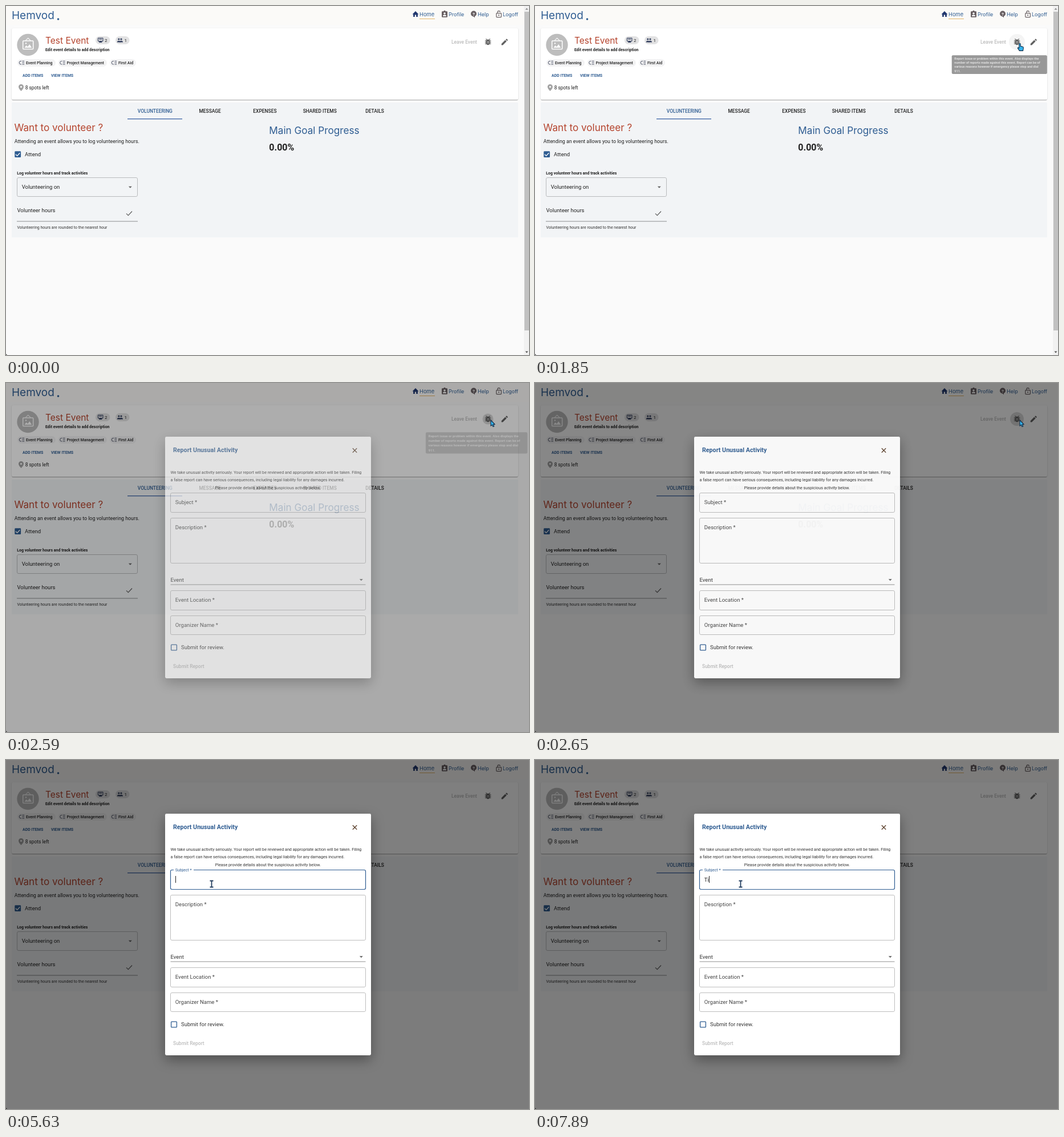
An HTML page with a canvas for the animation above (8000 ms loop, 917x611 px).

```html
<!DOCTYPE html>
<html lang="en">
<head>
<meta charset="utf-8">
<title>Report unusual activity</title>
<style>
html, body { margin: 0; width: 100%; height: 100%; overflow: hidden; background: #fafafa; }
canvas { display: block; }
</style>
</head>
<body>
<canvas id="stage" width="917" height="611"></canvas>
<script>
const W = 917, H = 611, LOOP = 8000, TICK = 66.3, OPEN = 2492;
const BLUE = '#2f5d92', NAVY = '#22386f', RED = '#b5442e', INK = '#212121', GREY = '#616161';
const UI = 'Roboto, sans-serif', HEAD = 'Inter, sans-serif';

const screen = document.getElementById('stage').getContext('2d');
const layer = () => {
  const c = document.createElement('canvas');
  c.width = W;
  c.height = H;
  return c.getContext('2d');
};
const page = layer(), modal = layer();
let g = page;

const clamp = v => Math.max(0, Math.min(1, v));
const mix = (a, b, u) => a + (b - a) * u;
const span = (t, start, length) => clamp((t - start) / length);
const sine = u => (1 - Math.cos(Math.PI * u)) / 2;

// cubic-bezier(.4, 0, .2, 1)
function ease(u) {
  if (u <= 0 || u >= 1) return clamp(u);
  let lo = 0, hi = 1, s = 0.5;
  for (let i = 0; i < 20; i++) {
    s = (lo + hi) / 2;
    const x = 1.2 * s * (1 - s) ** 2 + 0.6 * s * s * (1 - s) + s ** 3;
    if (x < u) lo = s; else hi = s;
  }
  return 3 * s * s * (1 - s) + s ** 3;
}

function text(s, x, y, size, color = INK, weight = 400, font = UI, align = 'left') {
  g.font = `${weight} ${size}px ${font}`;
  g.textAlign = align;
  g.fillStyle = color;
  g.fillText(s, x, y);
}
function box(x, y, w, h, r, fill, stroke, line = 1) {
  g.beginPath();
  g.roundRect(x, y, w, h, r);
  paint(fill, stroke, line);
}
function disc(x, y, r, fill, stroke, line = 1) {
  g.beginPath();
  g.arc(x, y, r, 0, 7);
  paint(fill, stroke, line);
}
function shape(d, x, y, fill, stroke, line = 1) {
  const p = new Path2D(d);
  g.save();
  g.translate(x, y);
  if (fill) { g.fillStyle = fill; g.fill(p); }
  if (stroke) { g.strokeStyle = stroke; g.lineWidth = line; g.stroke(p); }
  g.restore();
}
function paint(fill, stroke, line) {
  if (fill) { g.fillStyle = fill; g.fill(); }
  if (stroke) { g.strokeStyle = stroke; g.lineWidth = line; g.stroke(); }
}
function rect(x, y, w, h, fill) {
  g.fillStyle = fill;
  g.fillRect(x, y, w, h);
}
function shadow(blur, dy, color) {
  g.shadowBlur = blur;
  g.shadowOffsetY = dy;
  g.shadowColor = color;
}

function drawHeader() {
  rect(0, 0, W, 33, '#fbfaf8');
  text('Hemvod', 10, 23, 19, BLUE, 400, HEAD);
  disc(91.5, 23, 1.8, BLUE);

  shape('M0 5.5L5.5 0L11 5.5H9.4V10H6.7V6.5H4.3V10H1.6V5.5Z', 712.5, 9, NAVY);
  text('Home', 725, 18, 9.3, BLUE, 400, HEAD);
  rect(725, 22, 27, 1, '#e5b566');

  const tone = '#685f62';
  box(764, 9.3, 10, 10.4, 1.2, tone);
  disc(769, 9.3, 1.6, tone);
  disc(769, 13, 1.7, '#fff');
  shape('M0 2.4Q0 0 3 0T6 2.4Z', 766, 15.6, '#fff');
  text('Profile', 776, 18, 9, BLUE, 400, HEAD);

  disc(820, 13.5, 5, tone);
  shape('M0 0H3V3Z', 819, 17.5, tone);
  text('?', 820, 16.6, 8, '#fff', 700, UI, 'center');
  text('Help', 827, 18, 9.1, BLUE, 400, HEAD);

  box(859.8, 12.6, 8.6, 7, 0.8, null, tone, 1.2);
  shape('M0 4V2.4A2.2 2.2 0 0 1 4.4 2.4', 861.9, 8.4, null, tone, 1.2);
  disc(864.1, 16.1, 1.1, tone);
  text('Logoff', 871, 18, 8.8, BLUE, 400, HEAD);
}

function drawChip(label, x, w) {
  box(x, 93, w, 13, 6.5, '#f3f3f4');
  shape('M4 0H3A2.8 2.8 0 0 0 3 5.6H4M5.3 0H9.2M5.3 2.8H9.2M5.3 5.6H9.2', x + 3, 96.5, null, '#3c4257', 0.9);
  text(label, x + 15, 102, 7, INK, 500);
}

function drawCard() {
  g.save();
  shadow(2, 0.7, 'rgba(0,0,0,.22)');
  box(10, 39, 888, 125, 2.4, '#fff');
  g.restore();
  rect(11, 164, 886, 1, 'rgba(0,0,0,.2)');

  disc(38.5, 68, 19.2, '#bdbdbd');
  box(29.7, 61, 18, 14.5, 1, null, '#fff', 1.5);
  shape('M0 4.5L4.5 0L9 4.5', 34.2, 56.2, null, '#fff', 1.1);
  shape('M0 6L3.5 2L6 4.5L9 0L13 6Z', 32.2, 67, '#fff');
  disc(35, 65.4, 1.2, '#fff');

  text('Test Event', 69, 66, 15.5, RED, 400, HEAD);
  text('Edit event details to add description', 69, 79, 7, INK, 700);

  box(157, 53, 25.5, 14, 7, '#e2e2e3');
  box(161.4, 56, 8.6, 5.6, 0.8, null, '#34405f', 1.1);
  rect(163, 57.4, 5.4, 1.2, '#34405f');
  shape('M1.5 0H4.5L6 2.4H0Z', 162.7, 61.6, '#34405f');
  text('2', 173, 63, 8);
  box(192, 53, 24.5, 14, 7, '#e2e2e3');
  for (const x of [197.8, 202]) {
    disc(x, 58, 1.6, '#34405f');
    shape('M0 2.8Q0 0 3 0T6 2.8Z', x - 3, 60.7, '#34405f');
  }
  text('1', 207.5, 63, 8);

  drawChip('Event Planning', 20, 67);
  drawChip('Project Management', 91.5, 85.5);
  drawChip('First Aid', 182, 46);
  text('ADD ITEMS', 29, 123.5, 7, BLUE, 700);
  text('VIEW ITEMS', 79, 123.5, 7, BLUE, 700);
  shape('M4.5 0A4.5 4.5 0 0 1 9 4.5Q9 7.5 4.5 12Q0 7.5 0 4.5A4.5 4.5 0 0 1 4.5 0Z', 22, 137, '#a3a3a3');
  disc(26.5, 141.5, 1.6, '#fff');
  text('8 spots left', 33.7, 145.5, 8.4);
  text('Leave Event', 781, 66, 8.4, '#bcbcbc', 500);
}

function drawTools() {
  box(842, 58.6, 6.2, 9.6, 3.1, GREY);
  shape('M0 2.6H10.4M0 5.2H10.4M0 7.8H10.4M3 .8L1.6 -.8M7.4 .8L8.8 -.8', 839.9, 58.3, null, GREY, 1.3);
  rect(844, 61.9, 2.4, 1, '#eee');
  rect(844, 64.1, 2.4, 1, '#eee');
  shape('M0 8.4L6.6 1.8L9 4.2L2.4 10.8H0ZM7.4 1L8.4 0Q9 -.5 9.6 0L10.8 1.2Q11.3 1.8 10.8 2.4L9.8 3.4Z', 868.7, 57.8, GREY);
}

function drawPanel() {
  rect(10, 169, 888, 236, '#f2f4f6');
  ['VOLUNTEERING', 'MESSAGE', 'EXPENSES', 'SHARED ITEMS', 'DETAILS'].forEach((s, i) =>
    text(s, 261.3 + i * 96.3, 186.8, 8.45, i ? INK : BLUE, 500, UI, 'center'));
  rect(213, 197, 96, 1.3, '#3d63a5');

  text('Want to volunteer ?', 14.5, 219, 17.1, RED, 400, HEAD);
  text('Attending an event allows you to log volunteering hours.', 14.7, 239.8, 8.85);
  box(15.3, 254.3, 10.8, 10.8, 1.4, BLUE);
  shape('M0 3L2.6 5.6L7.4 .4', 17, 256.8, null, '#fff', 1.3);
  text('Attend', 33, 263, 9.55);
  text('Log volunteer hours and track activities', 19.2, 294.5, 7, INK, 700);
  box(19.5, 300.5, 211, 33, 2.4, null, '#b9bbbd');
  text('Volunteering on', 27.7, 320, 9.55);
  shape('M0 0H6L3 3Z', 214.8, 315.8, GREY);
  text('Volunteer hours', 19.4, 361, 9.55);
  shape('M0 4.4L3.3 7.6L10 .5', 211, 359, null, GREY, 1.3);
  rect(19, 376.5, 212, 1, '#8b8d8f');
  text('Volunteering hours are rounded to the nearest hour', 19.4, 389.5, 7, '#333');

  text('Main Goal Progress', 461.3, 224, 17.15, BLUE, 400, HEAD);
  text('0.00%', 461.3, 253.3, 16, INK, 700);
}

function drawScrollbar() {
  rect(908, 0, 9, H, '#f1f1f1');
  rect(909, 10, 8, 558, '#c1c1c1');
  shape('M0 3L2.5 0L5 3Z', 910.5, 3.5, '#8a8a8a');
  shape('M0 0L2.5 3L5 0Z', 910.5, 604.5, '#505050');
}

function drawField(label, y, h) {
  box(288.5, y + 0.5, 342, h, 2.4, null, '#bdbdbd');
  text(label, 296.8, y + 20, 9.55, '#444');
}

function drawSubject(t) {
  const u = ease(span(t, 3500, 200)), focused = t >= 3500;
  box(288.5, 192.5, 342, 34, 2.4, null, focused ? BLUE : '#bdbdbd', focused ? 1.2 : 1);
  if (focused) rect(mix(310, 294, u), 191, mix(0, 35, u), 3, '#fff');
  text('Subject *', 296.8, mix(212.3, 194.6, u), mix(9.55, 7.2, u), focused ? BLUE : '#444');
  if (!focused) return;

  const typed = t < 7750 ? '' : t < 7880 ? 'T' : 'Ti';
  text(typed, 296.8, 212.5, 9.55);
  const blinks = [4030, 4570, 5085, 5625, 6155, 6685, 7145, 7685].filter(b => t >= b - 5).length;
  if (blinks % 2 === 0) rect(297 + g.measureText(typed).width, 203, 1, 12, INK);
}

function drawModal(t) {
  g = modal;
  g.clearRect(0, 0, W, H);
  g.save();
  shadow(22, 8, 'rgba(0,0,0,.36)');
  box(279, 94, 361, 423, 2.4, '#fff');
  g.restore();

  text('Report Unusual Activity', 293, 121.3, 10.7, BLUE, 700);
  shape('M0 0L7.4 7.4M7.4 0L0 7.4', 607.8, 114.3, null, '#5b3f2b', 1.3);
  text('We take unusual activity seriously. Your report will be reviewed and appropriate action will be taken. Filing', 288.5, 159.3, 7.2, '#333');
  text('a false report can have serious consequences, including legal liability for any damages incurred.', 288.5, 171.5, 7.2, '#333');
  text('Please provide details about the suspicious activity below.', 459.3, 185.6, 7.2, '#333', 400, UI, 'center');
  drawSubject(t);
  drawField('Description *', 236, 79);
  text('Event', 288.5, 347.5, 9.55, '#333');
  shape('M0 0H6L3 3Z', 619.8, 343.3, GREY);
  rect(288.5, 352.5, 342, 1, '#8f8f8f');
  drawField('Event Location *', 363, 34);
  drawField('Organizer Name *', 407, 33);
  box(289.6, 458.1, 9.8, 9.8, 1, null, BLUE, 1.3);
  text('Submit for review.', 307, 466.3, 9.5, '#333');
  text('Submit Report', 293, 499, 8.5, '#bdbdbd', 500);
}

function drawTip(lines, x, y, w, h, inner, alpha, grow) {
  if (alpha <= 0) return;
  const k = mix(0.75, 1, grow);
  g.save();
  g.globalAlpha = alpha;
  g.translate(x + w / 2, y);
  g.scale(k, k * k);
  box(-w / 2, 0, w, h, 2.4, 'rgba(97,97,97,.92)');
  lines.forEach((s, i) => text(s, inner - w / 2, 8.7 + i * 8.5, 6, '#fff', 700));
  g.restore();
}

function drawTips(t) {
  const edit = ease(span(t, 830, 210)), editOut = ease(span(t, 1640, 120));
  drawTip(['Edit event'], 856, 86.5, 35.5, 13, 4.6, edit * (1 - editOut), edit - editOut);

  const bug = ease(span(t, 1760, 215)), bugOut = ease(span(t, 2530, 130));
  drawTip([
    'Report issue or problem within this event. Also displays the',
    'number of reports made against this event. Report can be of',
    'various reasons however if emergency please stop and dial',
    '911.'
  ], t < OPEN ? 724 : 734.8, 86.3, 180.6, 38.2, 5, bug * (1 - bugOut), bug - ease(span(t, 2575, 80)));
}

function pointerAt(t) {
  const legs = [
    [60, 663, 887, 600, 867, 62],
    [840, 150, 867, 62, 870, 65],
    [1600, 200, 870, 65, 850, 65],
    [2870, 580, 850, 65, 360, 217]
  ];
  const [start, length, x0, y0, x1, y1] = legs.filter(l => t >= l[0]).pop() || legs[0];
  const u = sine(span(t, start, length));
  return { x: mix(x0, x1, u), y: mix(y0, y1, u) };
}

function drawPointer(t, { x, y }, hand) {
  if (t < 60) return;
  g.lineJoin = 'round';
  if (hand) {
    shape('M-1.2 1Q0 -.8 1.2 1V5L5 5.8Q6.6 6.3 6.4 8L5.6 13H-.6L-3.6 8.6Q-4 7.4 -2.8 7.4L-1.2 8.4Z', x, y + 0.4, '#35b4ee', '#152c45', 1.1);
  } else if (t > 2900 && y > 192 && x < 630) {
    shape('M-3 -5.5H3M0 -5.5V5.5M-3 5.5H3', x + 0.5, y, null, '#243f5f', 1.8);
  } else {
    shape('M0 0V10.2L2.4 8.2L4 11.6L5.8 10.7L4.2 7.5H7.2Z', x, y, '#35b4ee', '#152c45', 1.1);
  }
}

function drawPage(t, pos) {
  g = page;
  rect(0, 0, W, H, '#fafafa');
  drawHeader();
  drawCard();
  const over = [874, 845].find(x => Math.hypot(pos.x - x, pos.y - 63) < 14);
  const hovered = t > 60 && t < 2535 ? over : 0;
  if (hovered) disc(hovered, 63, 14, 'rgba(0,0,0,.045)');
  if (t > 2380 && t < 2535) disc(845, 63, mix(7, 14, span(t, 2380, 130)), 'rgba(0,0,0,.03)');
  if (t >= 2535 && t < 2900) disc(845, 63, mix(9.5, 12, span(t, 2585, 65)), 'rgba(0,0,0,.15)');
  drawTools();
  drawPanel();
  if (t < OPEN) drawScrollbar();
  shape('M0 0Q0 3 3 3H0Z', 0, 608, '#111');
  return hovered;
}

function render(now) {
  const t = Math.floor((now % LOOP + 15) / TICK) * TICK;
  const pos = pointerAt(t);
  const hovered = drawPage(t, pos);
  const open = ease(span(t, OPEN, 225));
  screen.drawImage(page.canvas, 0, 0);
  if (open > 0) {
    drawModal(t);
    screen.fillStyle = `rgba(0,0,0,${open / 2})`;
    screen.fillRect(0, 0, W, H);
    screen.globalAlpha = open;
    screen.drawImage(modal.canvas, 0, 0);
    screen.globalAlpha = 1;
  }
  g = screen;
  drawTips(t);
  drawPointer(t, pos, hovered && t < OPEN);
}

const begin = performance.now();
function loop() {
  render(performance.now() - begin);
  requestAnimationFrame(loop);
}
loop();
</script>
</body>
</html>
```
